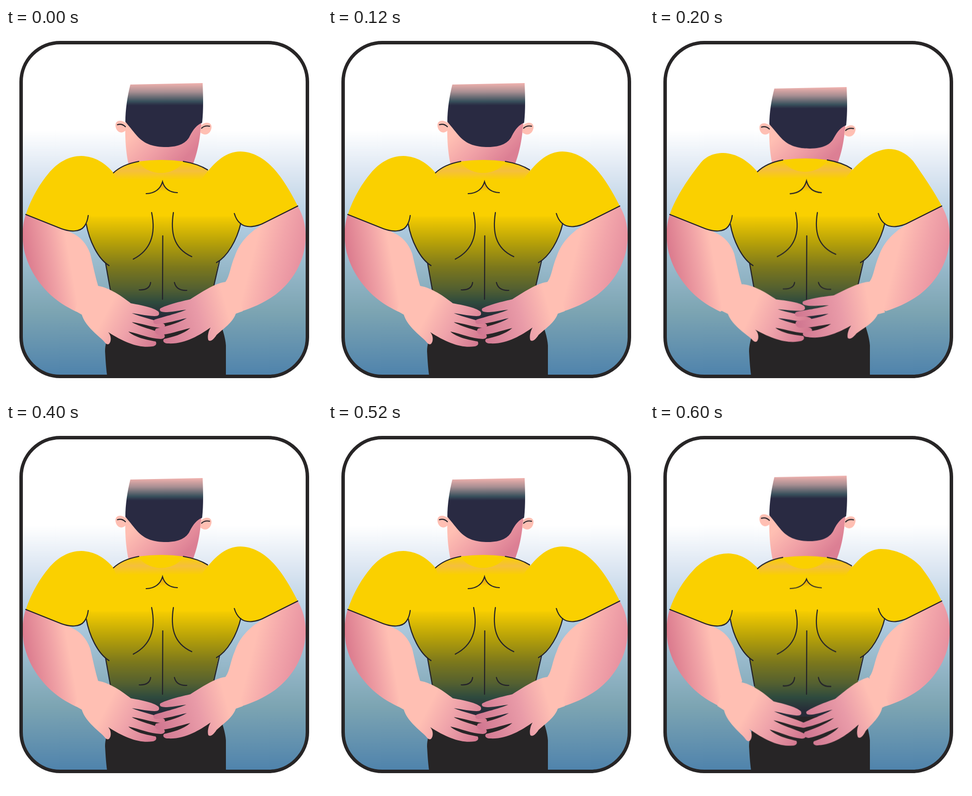
Write an HTML page without scripts that moves like this. It is 638 px wide and 740 px high and loops after 800 ms.

```html
<!DOCTYPE html>
<html lang="en">
<head>
<meta charset="utf-8">
<title>Back stretch</title>
<style>
html, body { margin: 0; width: 100%; height: 100%; overflow: hidden; background: #fff; }
svg { display: block; width: 100%; height: 100%; }
.line { fill: none; stroke: #23222a; stroke-width: 2.2; stroke-linecap: round; }

.move, .sleeve { animation: pose .8s step-end infinite; }
@keyframes pose {
  0%, 50%, 100% { transform: none; }
  25% { transform: var(--up); }
  75% { transform: var(--down); }
}
.head { transform-origin: 0 318px; --up: scaleY(.961); --down: scaleY(1.023); }
.yoke { transform-origin: 0 378px; --up: scaleY(1.027); --down: scaleY(.981); }
.nape { transform-origin: 0 333px; --up: scaleY(1.08); --down: scaleY(.8); }
.blades { transform-origin: 0 465px; --up: translateY(-5px) scaleY(.947); --down: scaleY(.947); }
.loin { transform-origin: 0 512px; --up: scaleY(.88); --down: scaleY(1.13); }
.hand-l { transform-origin: 130px 510px; --up: rotate(-3.6deg); --down: rotate(3deg); }
.hand-r { transform-origin: 450px 535px; --up: rotate(5.8deg); --down: rotate(-6.8deg); }

.sleeve-l { animation-name: sleeve-l; }
.sleeve-r { animation-name: sleeve-r; }
@keyframes sleeve-l {
  0%, 50%, 100% { d: path("M40 376C52 340 70 312 86 293C105 270 128 258 152 258C180 259 200 272 217 292L245 380H166C165 387 163 393 158 400C150 411 130 413 105 402Z"); }
  25% { d: path("M40 376C52 340 80 300 100 275C112 258 130 252 148 252C175 253 197 267 217 290L245 380H166C165 387 163 393 158 400C150 411 130 413 105 402Z"); }
  75% { d: path("M40 376C52 340 72 313 90 294C110 274 134 263 158 263C185 264 202 277 218 293L245 380H166C165 387 163 393 158 400C150 411 130 413 105 402Z"); }
}
@keyframes sleeve-r {
  0%, 50%, 100% { d: path("M589 359C577 335 560 305 541 284C522 263 498 249 473 249C445 250 425 265 397 302L380 380H463C465 385 468 390 473 394C485 404 505 402 525 391Z"); }
  25% { d: path("M589 359C577 335 550 295 531 268C516 251 500 244 481 244C452 246 425 265 397 300L380 380H463C465 385 468 390 473 394C485 404 505 402 525 391Z"); }
  75% { d: path("M589 359C577 335 565 313 546 289C525 267 494 254 466 254C440 255 425 270 397 304L380 380H463C465 385 468 390 473 394C485 404 505 402 525 391Z"); }
}
</style>
</head>
<body>
<svg viewBox="0 0 638 740">
  <defs>
    <linearGradient id="sky" gradientUnits="userSpaceOnUse" x1="0" y1="190" x2="0" y2="700">
      <stop offset="0" stop-color="#fff"/>
      <stop offset=".03" stop-color="#fff"/>
      <stop offset=".2" stop-color="#dce6f2"/>
      <stop offset=".42" stop-color="#aecadf"/>
      <stop offset=".75" stop-color="#7ca4b2"/>
      <stop offset="1" stop-color="#4f83ac"/>
    </linearGradient>
    <linearGradient id="hair" gradientUnits="userSpaceOnUse" x1="0" y1="111" x2="0" y2="156">
      <stop offset="0" stop-color="#f2b2ae"/>
      <stop offset=".4" stop-color="#a78e92"/>
      <stop offset=".82" stop-color="#38505c"/>
      <stop offset="1" stop-color="#292a42"/>
    </linearGradient>
    <linearGradient id="neck" gradientUnits="userSpaceOnUse" x1="258" y1="212" x2="335" y2="290">
      <stop offset="0" stop-color="#ffbfb3"/>
      <stop offset=".5" stop-color="#f0a0a6"/>
      <stop offset="1" stop-color="#dc7f94"/>
    </linearGradient>
    <linearGradient id="shirt" gradientUnits="userSpaceOnUse" x1="0" y1="376" x2="0" y2="580">
      <stop offset="0" stop-color="#fad000"/>
      <stop offset=".27" stop-color="#b8a208"/>
      <stop offset=".52" stop-color="#7c781c"/>
      <stop offset=".73" stop-color="#546030"/>
      <stop offset=".87" stop-color="#2e4a3e"/>
      <stop offset="1" stop-color="#272c38"/>
    </linearGradient>
    <linearGradient id="collar" gradientUnits="userSpaceOnUse" x1="0" y1="270" x2="0" y2="306">
      <stop offset="0" stop-color="#f0b070" stop-opacity="0"/>
      <stop offset=".5" stop-color="#f0b070" stop-opacity=".55"/>
      <stop offset="1" stop-color="#f0b070" stop-opacity="0"/>
    </linearGradient>
    <linearGradient id="dip" gradientUnits="userSpaceOnUse" x1="0" y1="309" x2="0" y2="329">
      <stop offset="0" stop-color="#d99020"/>
      <stop offset="1" stop-color="#fad000"/>
    </linearGradient>
    <linearGradient id="arm-l" gradientUnits="userSpaceOnUse" x1="36" y1="440" x2="122" y2="425">
      <stop offset="0" stop-color="#db7b8e"/>
      <stop offset=".6" stop-color="#f0a2a6"/>
      <stop offset="1" stop-color="#ffbfb3"/>
    </linearGradient>
    <linearGradient id="arm-r" gradientUnits="userSpaceOnUse" x1="602" y1="465" x2="502" y2="440">
      <stop offset="0" stop-color="#e68f9f"/>
      <stop offset=".5" stop-color="#f2a5aa"/>
      <stop offset="1" stop-color="#ffbfb3"/>
    </linearGradient>
    <linearGradient id="palm-l" gradientUnits="userSpaceOnUse" x1="205" y1="568" x2="312" y2="625">
      <stop offset="0" stop-color="#ffbfb3"/>
      <stop offset=".45" stop-color="#eea2aa"/>
      <stop offset="1" stop-color="#d37890"/>
    </linearGradient>
    <linearGradient id="palm-r" gradientUnits="userSpaceOnUse" x1="445" y1="560" x2="300" y2="600">
      <stop offset="0" stop-color="#ffbfb3"/>
      <stop offset=".4" stop-color="#e99ba8"/>
      <stop offset="1" stop-color="#d07690"/>
    </linearGradient>
  </defs>

  <rect x="30.5" y="29.5" width="578" height="673" rx="79" fill="url(#sky)"/>

  <g class="move head">
    <path fill="url(#neck)" d="M241 185C240 225 242 250 248 278V300H370L377 276C387 250 392 225 395 185Z"/>
    <g fill="#ffbfb3">
      <path d="M242 192C233 184 221 186 221 196C221 207 231 216 241 207Z"/>
      <path d="M394 196C403 188 415 190 415 200C414 213 402 220 392 210Z"/>
    </g>
    <path fill="url(#hair)" d="M251 114C245 138 241 165 241 189C252 202 258 210 265 218C280 235 300 240 323 240C350 240 365 231 371 218C378 204 386 195 396 191C399 165 398 135 397 111Z"/>
    <path class="line" d="M225 195Q234 192 241 199M395 202Q401 196 411 198"/>
  </g>

  <path fill="#272526" d="M211 572C211 615 200 630 200 652C201 670 202 685 204 700H444V640C443 625 438 610 430 585L420 570Z"/>
  <path fill="url(#shirt)" d="M160 376H476L474 394C465 430 445 460 429 472L420 518L424 592H213L211 530L201 474C182 456 167 430 162 395Z"/>

  <path fill="url(#arm-l)" d="M40 376C33 395 32 420 36 445C45 490 75 530 110 554C122 562 134 568 142 572L175 550L186 520C180 500 176 480 170 455C163 435 150 420 130 412L105 390Z"/>
  <path fill="url(#arm-r)" d="M589 359C600 378 606 400 605 425C603 470 580 510 545 537C520 555 497 564 476 571L448 550L443 512C452 500 453 480 462 460C472 430 495 410 515 398L530 380Z"/>

  <g class="move yoke">
    <path fill="#fad000" d="M217 292Q235 275 268 269Q315 263 358 269Q388 274 408 287L461 380H166Z"/>
    <path fill="url(#collar)" d="M217 292Q235 275 268 269C285 300 341 300 358 269Q388 274 408 287L398 306H222Z"/>
  </g>
  <path class="sleeve sleeve-l" fill="#fad000" d="M40 376C52 340 70 312 86 293C105 270 128 258 152 258C180 259 200 272 217 292L245 380H166C165 387 163 393 158 400C150 411 130 413 105 402Z"/>
  <path class="sleeve sleeve-r" fill="#fad000" d="M589 359C577 335 560 305 541 284C522 263 498 249 473 249C445 250 425 265 397 302L380 380H463C465 385 468 390 473 394C485 404 505 402 525 391Z"/>

  <g class="line">
    <path class="move yoke" d="M217 292Q235 275 268 269M358 269Q388 274 407 286"/>
    <path d="M40 376L105 402C130 413 150 411 158 400C163 393 165 387 166 378M589 359L525 391C505 402 485 404 473 394C466 388 463 381 461 374"/>
    <path d="M162 395C168 428 185 465 208 479M474 394C466 428 447 461 425 473M201 474L211 530M431 470L420 518M316.500 419L316 547"/>
    <g class="move nape">
      <path fill="url(#dip)" stroke="none" d="M316 309Q312 323 304 329H328Q320 323 316 309Z"/>
      <path d="M283 334Q309 333 316 310Q322 331 346 332"/>
    </g>
    <path class="move blades" d="M294 372C302 410 296 446 257 466M338 372C332 410 337 444 375 461"/>
    <path class="move loin" d="M269 528Q290 529 292 513M340 513Q344 530 365 529"/>
  </g>

  <path class="move hand-l" fill="url(#palm-l)" d="M186 520C210 524 234 541 252 555C280 560 300 565 308 572C311 578 308 581 300 581C280 580 265 576 254 575C272 583 300 588 318 596C324 600 320 605 314 605C290 602 275 596 254 593C268 602 300 609 318 617C324 622 319 627 312 627C290 626 270 617 247 612C260 624 285 629 302 632C305 636 303 641 296 642C270 646 240 635 206 613C213 620 213 632 208 637C203 640 200 634 195 629C180 615 160 600 153 578L139 570L150 535Z"/>
  <path class="move hand-r" fill="url(#palm-r)" d="M443 512C420 515 395 533 372 547C345 553 320 560 311 566C309 572 315 573 325 573C340 572 352 569 364 568C345 576 315 583 300 588C295 592 298 597 305 597C325 596 345 589 365 585C345 597 320 602 303 606C298 611 302 618 310 619C330 618 350 610 372 605C358 618 335 623 319 627C315 632 320 636 327 636C360 638 390 620 413 604C408 612 406 625 409 630C414 633 420 627 425 619C440 605 457 595 464 576L478 571L470 540Z"/>

  <rect x="30.5" y="29.5" width="578" height="673" rx="79" fill="none" stroke="#272526" stroke-width="7"/>
</svg>
</body>
</html>
```
